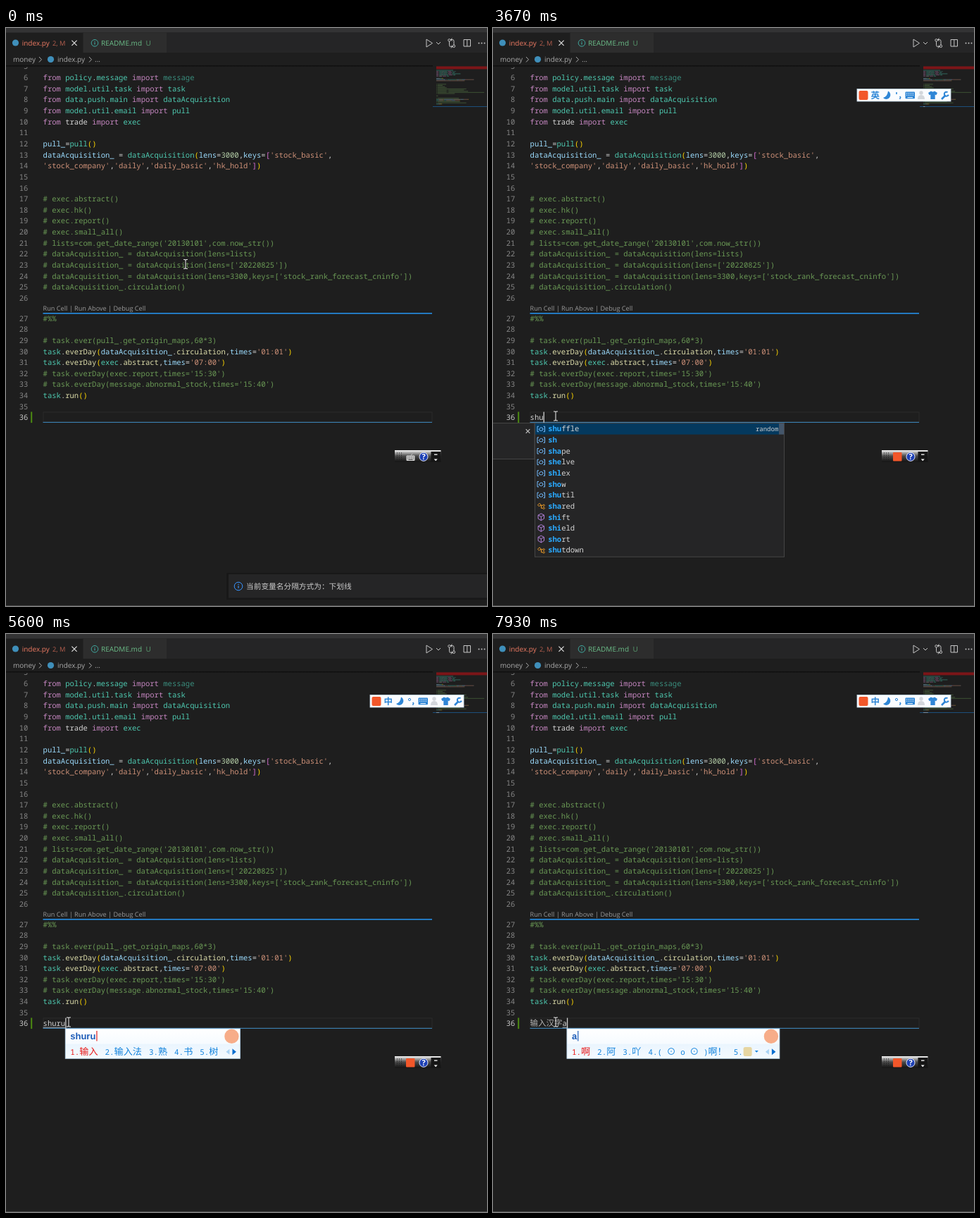
Write an HTML page that moves like this. It is 683x820 px and loops after 8 s.

```html
<!DOCTYPE html>
<html lang="en">
<head>
<meta charset="utf-8">
<title>Editor with input method</title>
<style>
  html, body { margin: 0; width: 100%; height: 100%; overflow: hidden; background: #1e1e1e; }
  svg { display: block; }
  text { white-space: pre; text-rendering: geometricPrecision; }
  .code { font: 10.54px "Noto Sans Mono", "DejaVu Sans Mono", monospace; }
  .ui { font: 10px "Open Sans", "Noto Sans", sans-serif; }
  .cjk { font-family: "Noto Sans CJK SC", "Noto Sans CJK", sans-serif; }
  .cand { font: 10.9px "Noto Sans Mono", monospace; }
  .cand .cjk { font-size: 13.1px; }
</style>
</head>
<body>
<svg id="stage" width="683" height="820" viewBox="0 0 683 820"></svg>
<script>
const LOOP = 8000, ROW = 15.65, COL = 6.325, LEFT = 52.6;
const stage = document.getElementById('stage');

function el(parent, tag, attrs, content) {
  const node = document.createElementNS('http://www.w3.org/2000/svg', tag);
  for (const k in attrs) node.setAttribute(k, attrs[k]);
  if (content !== undefined) node.textContent = content;
  parent.appendChild(node);
  return node;
}
const group = (parent = stage) => el(parent, 'g', {});
const rect = (p, x, y, width, height, fill, more) =>
  el(p, 'rect', { x, y, width, height, fill, ...more });
const path = (p, d, stroke, width = 1, fill = 'none') =>
  el(p, 'path', { d, stroke, 'stroke-width': width, fill });
const disc = (p, cx, cy, r, fill, more) => el(p, 'circle', { cx, cy, r, fill, ...more });
const text = (p, cls, x, y, fill, s, more) =>
  el(p, 'text', { class: cls, x, y, fill, ...more }, s);

function gradient(id, stops) {
  const g = el(defs, 'linearGradient', { id, x1: 0, y1: 0, x2: 0, y2: 1 });
  for (const [offset, color] of stops) el(g, 'stop', { offset, 'stop-color': color });
}
const defs = el(stage, 'defs', {});
gradient('tray', [[0, '#ffffff'], [.12, '#c9c9c9'], [.5, '#4a4a4a'], [1, '#141414']]);
gradient('ime', [[0, '#ffffff'], [.5, '#f6fbff'], [.52, '#eaf5fe'], [1, '#f4faff']]);
gradient('shade', [[0, '#0c0c0c'], [1, '#1e1e1e']]);

// ---------- code ----------
const CODE = `from policy.message import message
from model.util.task import task
from data.push.main import dataAcquisition
from model.util.email import pull
from trade import exec

pull_=pull()
dataAcquisition_ = dataAcquisition(lens=3000,keys=['stock_basic',
'stock_company','daily','daily_basic','hk_hold'])


# exec.abstract()
# exec.hk()
# exec.report()
# exec.small_all()
# lists=com.get_date_range('20130101',com.now_str())
# dataAcquisition_ = dataAcquisition(lens=lists)
# dataAcquisition_ = dataAcquisition(lens=['20220825'])
# dataAcquisition_ = dataAcquisition(lens=3300,keys=['stock_rank_forecast_cninfo'])
# dataAcquisition_.circulation()

#%%

# task.ever(pull_.get_origin_maps,60*3)
task.everDay(dataAcquisition_.circulation,times='01:01')
task.everDay(exec.abstract,times='07:00')
# task.everDay(exec.report,times='15:30')
# task.everDay(message.abnormal_stock,times='15:40')
task.run()

`.split('\n');

const BRACKETS = ['#ffd700', '#da70d6', '#179fff'];
const TEAL = '#4ec9b0', BLUE = '#9cdcfe', PLAIN = '#d4d4d4';
let depth = 0;

function tokens(line) {
  if (line[0] === '#') return [[line, '#6a9955']];
  const isImport = line.startsWith('from');
  const out = [];
  for (const m of line.matchAll(/'[^']*'|\w+|\s+|./g)) {
    const s = m[0], next = line[m.index + s.length], prev = line[m.index - 1];
    let color = PLAIN;
    if (s[0] === "'") color = '#ce9178';
    else if (/^\d/.test(s)) color = '#b5cea8';
    else if (s === 'from' || s === 'import') color = '#c586c0';
    else if ('(['.includes(s)) color = BRACKETS[depth++];
    else if (')]'.includes(s)) color = BRACKETS[--depth];
    else if (/^\w/.test(s)) {
      if (isImport) color = s === 'trade' ? PLAIN : s === 'message' && !next ? '#3a8e7e' : TEAL;
      else if (prev === '.') color = '#dcdcaa';
      else color = s.endsWith('_') || next === '=' ? BLUE : TEAL;
    }
    out.push([s, color]);
  }
  return out;
}

const baseline = n => 74 + (n - 6) * ROW + (n > 26 ? 12.9 : 0);
const mapY = n => 52.9 + (n - 1) * 1.65;

function lineNumber(n) {
  text(stage, 'code', 31.4, baseline(n), n === 36 ? '#c6c6c6' : '#858585', n, { 'text-anchor': 'end' });
}

function drawCode() {
  lineNumber(5);
  rect(stage, 611, 54.4, 72, 4, '#7c1518');
  rect(stage, 611, mapY(5), 24, 1, TEAL, { opacity: .4 });
  CODE.forEach((line, i) => {
    const n = i + 6;
    lineNumber(n);
    const row = text(stage, 'code', LEFT, baseline(n), PLAIN);
    let col = 0;
    for (const [s, fill] of tokens(line)) {
      el(row, 'tspan', { fill }, s);
      for (const w of s.matchAll(/\S+/g))
        rect(stage, 611 + (col + w.index) * .82, mapY(n), w[0].length * .82, 1, fill, { opacity: .42 });
      col += s.length;
    }
  });
  text(stage, 'ui', LEFT, 401.4, '#999999', 'Run Cell | Run Above | Debug Cell', { style: 'font-size:9.13px' });
  rect(stage, 52.5, 404, 552.5, 1.7, '#2488db');
  rect(stage, 53, 545, 552, 14, 'none', { stroke: '#2b2b2b' });
  rect(stage, 52.5, 558.9, 552.5, 1.1, '#3a7fb2');
  rect(stage, 35.2, 544.5, 2, 15.6, '#4c8a12');
  rect(stage, 606, 111, 77, 1, '#1d4f7c');
}

// ---------- window frame ----------
function info(p, x, y, r, color) {
  disc(p, x, y, r, 'none', { stroke: color, 'stroke-width': 1 });
  path(p, `M${x} ${y - .8}v${r * .62}M${x} ${y - r * .55}v1.2`, color, 1.2);
}
const cross = (p, x, y, r, color) =>
  path(p, `M${x - r} ${y - r}l${2 * r} ${2 * r}m0 ${-2 * r}l${-2 * r} ${2 * r}`, color, 1.1);

function drawFrame() {
  rect(stage, 0, 0, 683, 53, '#1e1e1e');
  rect(stage, 0, 53, 606, 2.5, 'url(#shade)');
  rect(stage, 0, 0, 683, 6.5, '#333334');
  rect(stage, 109, 6.5, 574, 28.5, '#252526');
  rect(stage, 110, 6.5, 118, 28.5, '#2d2d2d');
  disc(stage, 13.5, 21, 4.6, '#3f8fba');
  text(stage, 'ui', 22.7, 24.8, '#ee7b63', 'index.py');
  text(stage, 'ui', 66, 24.6, '#b8604f', '2, M', { style: 'font-size:9.3px' });
  cross(stage, 97, 21.3, 3.6, '#e4e4e4');
  info(stage, 126, 21.3, 4.8, '#3fa9a0');
  text(stage, 'ui', 135, 24.8, '#6bbd88', 'README.md');
  text(stage, 'ui', 198.6, 24.8, '#579a6e', 'U');
  const pale = '#c5c5c5';
  path(stage, 'M597 16v11l8.5-5.5z', pale);
  path(stage, 'M611 20l3 3 3-3', pale);
  path(stage, 'M629.5 19v5.5q0 2 2 2h2.5m-2-2l2 2-2 2M636 24v-5.500q0-2-2-2h-2.500m2-2l-2 2 2 2', pale);
  disc(stage, 629.5, 17.3, 1.7, 'none', { stroke: pale });
  disc(stage, 636, 25.700, 1.7, 'none', { stroke: pale });
  path(stage, 'M650 16.5h9.500v9.500h-9.500zM654.8 16.500v9.500', pale);
  for (let i = 0; i < 3; i++) disc(stage, 671.5 + i * 4, 21.500, 1, pale);

  const dim = '#a9a9a9';
  text(stage, 'ui', 10, 48.2, dim, 'money');
  path(stage, 'M47 41l3.500 3.700-3.500 3.700M118 41l3.500 3.700-3.500 3.700', dim);
  disc(stage, 63.5, 44.5, 4.6, '#3f8fba');
  text(stage, 'ui', 73, 48.2, dim, 'index.py');
  text(stage, 'ui', 126, 48.2, dim, '...');
  rect(stage, 0, 819, 683, 1, '#464646');
}

// ---------- floating parts ----------
function drawToast(p) {
  rect(p, 313, 773, 370, 38, '#181818');
  rect(p, 316, 775, 367, 33.500, '#252526');
  info(p, 330, 792, 5.8, '#3794ff');
  text(p, 'cjk', 341, 796, '#cccccc', '当前变量名分隔方式为：下划线', { 'font-size': 10.7 });
}

const SKY = '#2f86d6';
function keyboard(p, x, y, w, h, color, hole) {
  rect(p, x, y, w, h, color, { rx: 1 });
  for (let r = 0; r < 2; r++)
    for (let i = 0; i < 4; i++)
      rect(p, x + 1.6 + i * (w - 2) / 4, y + 1.6 + r * 2.5, 1.3, 1.2, hole);
  rect(p, x + 3, y + h - 2.2, w - 6, 1, hole);
}

function drawBar(p, lang) {
  rect(p, 517, 86.5, 133, 17.5, '#fafcff', { stroke: '#c4d9ea', 'stroke-width': .8 });
  rect(p, 519.500, 89, 13, 13, '#f2572a', { rx: 2 });
  text(p, 'cjk', 536.500, 100, SKY, lang, { 'font-size': 12.5, 'font-weight': 700 });
  path(p, 'M561 89.5a6 6 0 1 1-7 9.500q6-1.500 7-9.500z', 'none', 0, SKY);
  if (lang === '中') disc(p, 573, 93, 1.6, 'none', { stroke: SKY });
  else path(p, 'M573 91v3', SKY, 1.6);
  path(p, 'M577.700 97l1 1.500-1.200 2.300', SKY, 1.5);
  keyboard(p, 585.5, 90.5, 13.5, 9.800, SKY, '#fff');
  disc(p, 608, 92, 2.700, '#d3d7dc');
  path(p, 'M603 101q0-6 5-6t5 6z', 'none', 0, '#d3d7dc');
  path(p, 'M618 92l4-2.500q2.500 2 5 0l4 2.500-1.600 3.200-1.700-.7v6.500h-6.400v-6.500l-1.700 .7z', 'none', 0, SKY);
  path(p, 'M637 101l5.500-5.500', SKY, 2.6);
  path(p, 'M645.500 91.200a3 3 0 1 0 1.200 3.400', SKY, 2.1);
}

function drawTray(p, active) {
  rect(p, 552, 599, 65.5, 16.500, 'url(#tray)');
  for (let i = 0; i < 12; i++)
    rect(p, 555 + i % 3 * 3, 602.5 + (i / 3 | 0) * 3, 1, 1, '#1a1a1a');
  if (active) rect(p, 568, 602, 12.5, 12.5, '#f2572a', { rx: 1 });
  else {
    keyboard(p, 568.5, 606.5, 12, 7.500, '#d0d0d0', '#555');
    path(p, 'M575 606.500q0-2 2.500-2', '#d0d0d0', .8);
  }
  disc(p, 593, 608.3, 6, '#1c3fb4', { stroke: '#e8ecff', 'stroke-width': 1 });
  text(p, 'ui', 593, 612.3, '#fff', '?', { 'text-anchor': 'middle', style: 'font-weight:700;font-size:11px' });
  rect(p, 603.500, 601, 14, 14.5, '#161616');
  rect(p, 608, 604.5, 4.5, 1.3, '#fff');
  path(p, 'M607.700 611.500h5l-2.500 2.700z', 'none', 0, '#fff');
}

// kind letter, label, detail
const LISTS = {
  s: ['kS re', 'kS tkinter', 'vs this', 'vshuffle random', 'cset', 'fsetattr', 'cslice', 'fsorted',
    'cstaticmethod', 'cstr', 'fsum', 'csuper'],
  sh: ['vshuffle random', 'vsh', 'vshape', 'vshelve', 'vshlex', 'vshow', 'vshutil', 'cshared',
    'fshift', 'fshield', 'fshort', 'cshutdown']
};
LISTS.shu = LISTS.sh;

function kindIcon(p, kind, y) {
  if (kind === 'k') {
    rect(p, 63, y - 3.500, 10.500, 7.500, 'none', { stroke: '#c5c5c5' });
    path(p, `M65 ${y - 1}h6.500M65 ${y + 1.500}h6.500`, '#c5c5c5');
  } else if (kind === 'v') {
    path(p, `M65 ${y - 3.500}h-2v7.500h2M71.500 ${y - 3.500}h2v7.500h-2`, '#75beff');
    path(p, `M65.500 ${y}l2.700-2 2.800 1.300v2l-2.700 1.500-2.800-1.300z`, '#75beff');
  } else if (kind === 'c') {
    path(p, `M63.500 ${y - 1.500}l2.500-2.500 2 2-2.500 2.500zM67 ${y - 1}h3.500M68.500 ${y - 1}v4h2`, '#ee9d28');
    path(p, `M70.500 ${y - 1}l1.500-1.500 1.500 1.500-1.500 1.500zM70.500 ${y + 3}l1.500-1.500 1.500 1.500-1.500 1.500z`, '#ee9d28');
  } else {
    path(p, `M68.300 ${y - 5}l4.200 2.200v5l-4.200 2.600-4.200-2.600v-5zM64.100 ${y - 2.800}l4.200 2.200 4.200-2.200M68.300 ${y - .6}v5.400`, '#b180d7');
  }
}

function drawSuggest(p, typed) {
  const border = { stroke: '#454545', 'stroke-width': 1 };
  rect(p, -2, 560.5, 61, 51, '#252526', border);
  cross(p, 49.5, 572, 2.8, '#c5c5c5');
  rect(p, 59.5, 560.5, 354, 189.8, '#252526', border);
  rect(p, 60, 561, 346, ROW, '#04395e');
  rect(p, 406, 561, 7, ROW, '#44566a');
  LISTS[typed].forEach((item, i) => {
    const y = 568.7 + i * ROW, [label, detail] = item.slice(1).split(' ');
    kindIcon(p, item[0], y);
    const hit = typed.length;
    const row = text(p, 'code', 78.2, y + 3.6, '#d4d4d4', undefined, { 'font-weight': 500 });
    el(row, 'tspan', { fill: '#2aaaff', 'font-weight': 700 }, label.slice(0, hit));
    el(row, 'tspan', {}, label.slice(hit));
    if (detail) text(p, 'code', 405.300, y + 3, i ? '#9a9a9a' : '#d0d0d0', detail,
      { 'text-anchor': 'end', style: 'font-size:9px' });
  });
}

// a candidate starting with # is a small picture of that colour
const CANDIDATES = {
  s: '是 说 上 三 时', sh: '是 说 上 时 事', shu: '数 树 书 术 shuttle',
  shur: '输入 数人 熟人 书 树', shuru: '输入 输入法 熟 书 树',
  h: '好 和 后 \\(^o^)/~ #f3c8b4', ha: '哈 哈哈 还 蛤 #f3c8b4', han: '汉 韩 喊 含 寒',
  hanz: '汉字 汉子 韩 喊 汉', hanzi: '汉字 汉子 喊 汉 韩',
  a: '啊 阿 吖 (_⊙_o_⊙_)啊！ #e6d6a2'
};
const runs = s => s.match(/[ -~]+|[^ -~]+/g) || [];
const isAscii = s => /^[ -~]/.test(s);
const measure = (s, half, full) =>
  runs(s).reduce((w, r) => w + r.length * (isAscii(r) ? half : full), 0);

function fillRuns(node, s, attrs = {}) {
  for (const r of runs(s)) el(node, 'tspan', isAscii(r) ? {} : { class: 'cjk', ...attrs }, r);
}

function drawIme(p, x, typed) {
  const back = group(p);
  let at = x + 7, tail = 31;
  CANDIDATES[typed].split(' ').forEach((c, i) => {
    const pic = c[0] === '#';
    const label = `${i + 1}.` + (pic ? '' : c.replace(/_/g, ' '));
    fillRuns(text(p, 'cand', at, 597, i ? '#1182dc' : '#e81818'), label);
    at += measure(label, 6.54, 13.1);
    if (pic) {
      rect(p, at + .8, 586, 12, 13, c, { rx: 2.5 });
      path(p, `M${at + 17} 591h5l-2.500 2.800z`, 'none', 0, '#1182dc');
      at += 13.1;
      tail = 39;
    }
    at += 10;
  });
  const right = at - 10 + tail;
  rect(back, x, 560, right - x, 42.3, 'url(#ime)', { stroke: '#b4d2ea', 'stroke-width': .8 });
  disc(back, right - 12, 570.7, 10.2, '#f7ad89');
  path(p, `M${right - 15} 588.700v8l-5-4z`, 'none', 0, '#a9d3f4');
  path(p, `M${right - 11} 588.300v9l5.500-4.500z`, 'none', 0, '#0a6fd0');
  const bold = 'font:700 13px "Liberation Sans",Arial,sans-serif';
  const head = text(p, '', x + 7, 575, '#1d5cb8', typed, { style: bold });
  rect(p, x + 8 + head.getComputedTextLength(), 563, 1.2, 14.5, typed.length > 2 ? '#e02020' : '#1d5cb8');
}

// ---------- timeline ----------
// time, committed text, composing text, caret, suggestions
const STEPS = [
  [0, '', '', 0], [1400, '', '', 1], [1870, '', '', 0], [2330, '', '', 1], [2870, '', '', 0],
  [3330, 's', '', 1], [3400, 'sh', '', 1], [3530, 'shu', '', 1], [3600, 'shu', '', 1, 1],
  [3930, 'sh', '', 1, 1], [4070, 's', '', 1, 1], [4270, '', '', 1],
  [4670, '', 's', 1], [4870, '', 'sh', 1], [4930, '', 'shu', 1],
  [5470, '', 'shur', 1], [5600, '', 'shuru', 1], [5800, '输入', '', 1], [6330, '输入', '', 0],
  [6400, '输入', 'h', 1], [6530, '输入', 'ha', 1], [6670, '输入', 'han', 1],
  [6870, '输入', 'hanz', 1], [7000, '输入', 'hanzi', 1], [7130, '输入汉字', '', 1],
  [7670, '输入汉字', '', 0], [7870, '输入汉字', 'a', 1]
];

function drawTyping(p, [, done, typed, caret, suggest]) {
  const x0 = LEFT + measure(done, COL, 11.5), x = x0 + measure(typed, COL, 11.5);
  const row = text(p, 'code', LEFT, baseline(36), PLAIN);
  fillRuns(row, done + typed, { 'font-size': 11.5, 'font-weight': 300, fill: '#b4b4b4' });
  if (typed) rect(p, x0, 557.7, x - x0, .8, '#c8c8c8');
  if (caret) rect(p, x, 544.6, 1.3, 15.2, '#d0d0d0');
  rect(p, 611, mapY(36) + .3, (x - LEFT) / COL * .82, 1, PLAIN, { opacity: .5 });
  if (suggest) drawSuggest(p, done);
  if (typed) drawIme(p, x, typed);
}

const TRAIL = [[70, 255, 335], [270, 350, 480], [470, 487, 690], [600, 400, 744],
  [870, 110, 620], [1070, 80, 560], [1270, 89, 551]];
function pointer(t) {
  const q = Math.floor(t / 66.7) * 66.7;
  const i = TRAIL.findIndex(k => k[0] > q);
  if (i < 0) return [89, t < 3000 ? 551 : 550.5];
  if (i === 0) return [255, 335];
  const [t0, x0, y0] = TRAIL[i - 1], [t1, x1, y1] = TRAIL[i];
  const f = (q - t0) / (t1 - t0);
  return [x0 + (x1 - x0) * f, y0 + (y1 - y0) * f];
}

drawCode();
drawFrame();
const layers = ['toast', 'tray', 'typing', 'bar'].reduce((o, k) => ({ ...o, [k]: { g: group(), key: null } }), {});
const mouse = path(stage, 'M-3-6.500h2l1 1 1-1h2M0-5.500v11M-3 6.500h2l1-1 1 1h2', '#e0e0e0', 1.1);

// redraw a layer only when its state changes
function sync(name, key, draw) {
  const layer = layers[name];
  if (layer.key === key) return;
  layer.key = key;
  layer.g.replaceChildren();
  if (key !== false) draw(layer.g);
}

function render(t) {
  const step = STEPS.filter(s => s[0] <= t).pop();
  const lang = t < 1200 ? false : t >= 3130 && t < 4530 ? '英' : '中';
  sync('toast', t < 1870, drawToast);
  sync('tray', t < 1600 ? 'idle' : 'on', g => drawTray(g, t >= 1600));
  sync('typing', step[0], g => drawTyping(g, step));
  sync('bar', lang, g => drawBar(g, lang));
  mouse.setAttribute('transform', `translate(${pointer(t)})`);
}

const start = performance.now();
function tick() {
  render((performance.now() - start) % LOOP);
  requestAnimationFrame(tick);
}
tick();
</script>
</body>
</html>
```
